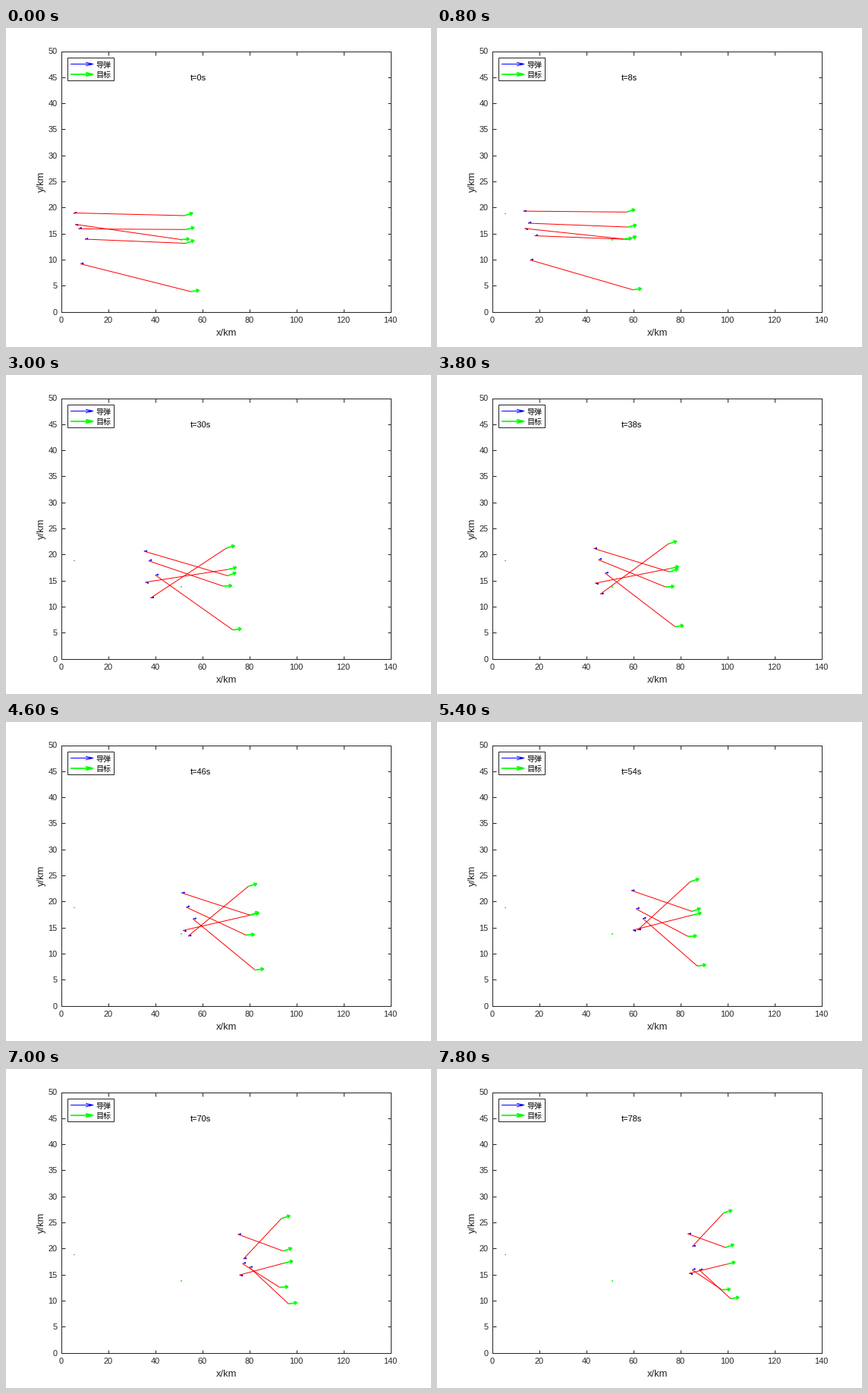
These frames come from a looping animation (560x420 px, 8 s). A matplotlib script:

```python
import numpy as np
import matplotlib.pyplot as plt
from matplotlib.animation import FuncAnimation
from numpy.polynomial import Polynomial

W, H, DPI = 560, 420, 80
PT = 72 / DPI                       # points per pixel
FRAMES, INTERVAL, STEP = 40, 200, 2
T = np.arange(FRAMES) * STEP        # seconds of flight
SWITCH = 25                         # when the targets are reassigned
KM_X, KM_Y = 3.1, 6.86              # pixels per kilometre
MISSILE_SPEED, TARGET_SPEED = 1.0, 0.6
BLUE, GREEN, RED, INK = "#0000ff", "#00ff00", "#ff0000", "#262626"

plt.rcParams["font.family"] = ["Liberation Sans", "Noto Sans CJK JP"]

# Start x, then heights at evenly spaced times, in stage pixels
MISSILES = [
    (89, 243.5, 233.8, 222.6, 217),
    (91, 258.5, 271.8, 274.2, 269),
    (95.5, 264.5, 246, 245.4, 264.5),
    (104, 278, 264.9, 258.7, 264.5),
    (98, 310.5, 295.8, 276, 233.5),
]
TARGETS = [
    (235, 247, 221.6, 189.5),
    (236.8, 265.3, 254.7, 257),
    (230.5, 278.5, 279.2, 290.7),
    (236.8, 283.5, 258.6, 235),
    (243.3, 347, 330.8, 302.3),
]
BEFORE = [0, 2, 1, 3, 4]
AFTER = [3, 1, 2, 4, 0]


def fly(x0, *heights, speed):
    """Smooth climb at constant speed: positions per frame and first velocity."""
    keys = np.linspace(0, T[-1], len(heights))
    climb = Polynomial.fit(keys, heights, len(heights) - 1)
    vy = climb.deriv()(T)
    vx = KM_X * np.sqrt(speed**2 - (vy / KM_Y)**2)
    x = x0 + np.append(0, np.cumsum((vx[1:] + vx[:-1]) / 2 * STEP))
    return np.column_stack([x, climb(T)]), np.array([vx[0], vy[0]])


def arrow_points(x, y, u, v, half):
    """Shaft and open head as one broken line."""
    tx, ty = x + u, y + v
    n = np.hypot(u, v)
    bx, by = tx - u / 3, ty - v / 3
    ox, oy = -v / n * half, u / n * half
    return ([x, tx, np.nan, bx + ox, tx, bx - ox],
            [y, ty, np.nan, by + oy, ty, by - oy])


fig = plt.figure(figsize=(W / DPI, H / DPI), dpi=DPI, facecolor="white")

# Plot frame
left, right, top, bottom = 72.5, 506.5, 30.5, 373.5
ax = fig.add_axes([left / W, 1 - bottom / H, (right - left) / W, (bottom - top) / H])
ax.set(xlim=(0, 140), ylim=(0, 50),
       xticks=range(0, 141, 20), yticks=range(0, 51, 5))
ax.tick_params(direction="in", top=True, right=True, length=4.5 * PT, width=PT,
               pad=5 * PT, color=INK, labelcolor=INK, labelsize=11 * PT)
ax.tick_params(axis="x", pad=6 * PT)
for spine in ax.spines.values():
    spine.set(linewidth=PT, color=INK)

# Overlay measured in stage pixels
stage = fig.add_axes([0, 0, 1, 1])
stage.set(xlim=(0, W), ylim=(H, 0))
stage.axis("off")


def line(xs, ys, color, width, z):
    return stage.plot(xs, ys, color=color, lw=width * PT, zorder=z,
                      solid_capstyle="butt", solid_joinstyle="miter")[0]


def label(x, y, s, size, color="black", **kw):
    kw = {"ha": "center", "va": "center", **kw}
    return stage.text(x, y, s, fontsize=size * PT, color=color, zorder=6, **kw)


label(290.5, 402, "x/km", 13, INK)
label(47, 202, "y/km", 13, INK, rotation=90)
clock = label(243, 66, "", 11, ha="left")

# Legend
stage.add_patch(plt.Rectangle((80.5, 38.5), 61, 30, fc="white", ec=INK, lw=PT, zorder=5))
for y, color, width, name in [(47.5, BLUE, 1, "导弹"), (61, GREEN, 1.7, "目标")]:
    line(*arrow_points(85, y, 30, 0, 2.3), color, width, 6)
    label(118, y, name, 10, ha="left", va="center_baseline")

# Starting marks left behind
line([89, 90], [243.5, 243.5], "#101030", 1, 2)
line([229.5, 231.5], [278.5, 278.5], GREEN, 1.5, 2)

missiles = [fly(*m, speed=MISSILE_SPEED) for m in MISSILES]
targets = [fly(*m, speed=TARGET_SPEED) for m in TARGETS]
missile_arrows = [line([], [], BLUE, 1, 3) for _ in missiles]
target_arrows = [line([], [], GREEN, 1.7, 4) for _ in targets]
links = [line([], [], RED, 1, 3.5) for _ in missiles]


def aim(arrows, flights, i, seconds, half):
    for art, (pos, v0) in zip(arrows, flights):
        art.set_data(*arrow_points(*pos[i], *(v0 * seconds), half))


def draw(i):
    aim(missile_arrows, missiles, i, 1.3, 1)
    aim(target_arrows, targets, i, 6, 2.2)
    goals = BEFORE if T[i] < SWITCH else AFTER
    for art, (pos, _), g in zip(links, missiles, goals):
        art.set_data(*zip(pos[i], targets[g][0][i]))
    clock.set_text(f"t={T[i]}s")
    return [*missile_arrows, *target_arrows, *links, clock]


anim = FuncAnimation(fig, draw, frames=FRAMES, interval=INTERVAL,
                     repeat=True, repeat_delay=0)
plt.show()
```
